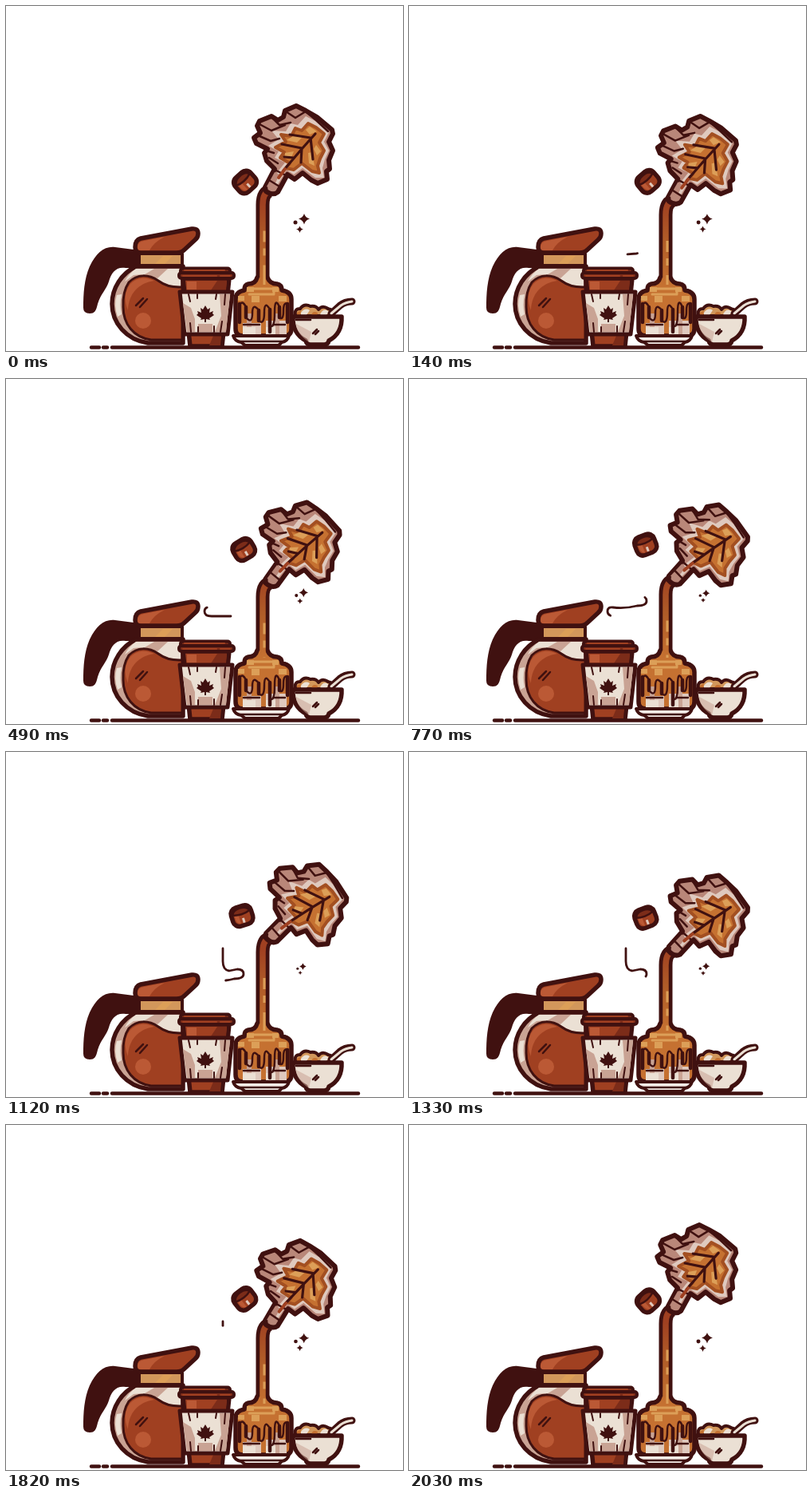
Animation of 498 by 432 pixels, one loop 2.1 s. Source, as an HTML page:

```html
<!DOCTYPE html>
<html lang="en">
<head>
<meta charset="utf-8">
<title>Maple syrup breakfast</title>
<style>
  html, body { margin: 0; width: 100%; height: 100%; overflow: hidden; background: #fff; }
  svg { display: block; width: 498px; height: 432px; }
  :root {
    --dark: #401110; --brown: #a04021; --rust: #bb5935; --deep: #7c2c19;
    --tan: #d2975b; --cream: #ebe0d4; --shade: #c9a394;
    --pink: #dfc9be; --mauve: #b98779; --amber: #c57131; --gold: #dc9f58; --syrup: #a34f21;
  }
  path, rect, circle { fill: none; stroke-linejoin: round; stroke-linecap: round; }
  .line { stroke: var(--dark); stroke-width: 5.5; }
  .mid { stroke: var(--dark); stroke-width: 4; }
  .thin { stroke: var(--dark); stroke-width: 2.5; }
  .pour { stroke-linecap: butt; }
  .dark { fill: var(--dark); }
  .brown { fill: var(--brown); }
  .rust { fill: var(--rust); }
  .deep { fill: var(--deep); }
  .tan { fill: var(--tan); }
  .cream { fill: var(--cream); }
  .shade { fill: var(--shade); }
  .pink { fill: var(--pink); }
  .mauve { fill: var(--mauve); }
  .amber { fill: var(--amber); }
  .gold { fill: var(--gold); }
</style>
</head>
<body>
<svg viewBox="0 0 498 432">
  <defs>
    <linearGradient id="flow" gradientUnits="userSpaceOnUse" x1="0" y1="235" x2="0" y2="350">
      <stop offset=".1" stop-color="#a04021"/>
      <stop offset=".5" stop-color="#b05c28"/>
      <stop offset="1" stop-color="#c57131"/>
    </linearGradient>
  </defs>
  <path class="line" style="stroke-width:4.5" d="M107 427.500H117M122 427.500H127M133 427.500H442"/>

  <!-- coffee pot -->
  <path class="dark" d="M97 378C97 360 98 342 105 326C113 309 124 300 137 302L168 306V328H150C138 326 132 334 129 345C126 355 119 360 115 373C113 382 111 385 105 385Q97 385 97 378Z"/>
  <path class="line shade" d="M163 326H222V422H178C151 418 133 397 133 373C133 353 145 335 163 326Z"/>
  <path class="cream" d="M163 329H219V351Q204 352 192 343T160 337L149 345Q154 335 163 329ZM139 362Q135 374 140 389L145 386Q142 374 145 361Z"/>
  <path class="shade" d="M186 329L174 336L190 341L203 329Z"/>
  <path class="mid brown" style="stroke-width:3" d="M154 346C165 335 179 336 191 344Q203 353 221 352V418H182C160 415 147 398 147 377Q146 358 154 346Z"/>
  <path class="rust" d="M156 348C165 339 176 339 186 344C166 347 154 360 153 381Q145 362 156 348Z"/>
  <circle class="rust" cx="172" cy="394" r="10"/>
  <path class="thin" d="M163 375L172 366M168 377L177 367"/>
  <path class="mid tan" d="M167 310H221V325H167Z"/>
  <path class="gold" d="M197 313L187 323H199L209 313Z"/>
  <path class="line brown" d="M162 302Q162 293 169 291L233 279Q241 278 241 285Q241 290 237 293L224 305Q220 309 214 309H169Q162 309 162 302Z"/>
  <path class="rust" d="M165 302Q165 295 173 294L199 289Q185 296 180 306H169Q165 306 165 302Z"/>

  <!-- takeaway cup -->
  <path class="line brown" d="M222 341H280L271 426H231Z"/>
  <path class="rust" d="M227 345H239V355H227Z"/>
  <path class="deep" d="M265 344H277L276 356H257ZM260 413H270L269 425H255Z"/>
  <rect class="mid deep" x="219" y="328.500" width="62" height="8" rx="3"/>
  <rect class="mid deep" x="217" y="334" width="69" height="7" rx="3"/>
  <path style="stroke:var(--brown);stroke-width:2" d="M224 331H274M222 338H264M269 338H281"/>
  <path class="line cream" style="stroke-width:5" d="M218 358H284L278 411H224Z"/>
  <path class="shade" d="M222 372L232 378L237 392V408H227ZM268 361H281L276 408H262L270 388ZM241 398H259V408H241Z"/>
  <path class="thin" style="stroke-width:2" d="M229 361L231 370M240 361V366M264 361L263 367M275 361L274 374M231 397L232 408M241 402V408M261 401V408M271 395L269 408"/>
  <path class="dark" transform="translate(250 385)" d="M0-10L3-5L6-7L5-1L10-3L9 0L11 2L5 6L6 8L1 7V11H-1V7L-6 8L-5 6L-11 2L-9 0L-10-3L-5-1L-6-7L-3-5Z"/>

  <!-- pouring syrup outline -->
  <path class="pour" stroke="var(--dark)" stroke-width="17"/>

  <!-- waffle stack -->
  <path class="line amber" d="M315 340Q313 348 304 348Q299 349 299 356Q288 358 288 367V404Q288 413 297 413H349Q358 413 358 404V367Q358 358 346 356Q346 349 340 348Q331 348 328 340"/>
  <path class="gold" d="M302 352H311V358H302ZM334 352H342V358H334ZM291 363H299V369H291ZM342 363H352V370H342ZM308 363H318V371H308Z"/>
  <path style="stroke:var(--gold);stroke-width:3" d="M309 354H336V361H305"/>
  <path class="pink" d="M297 397H320V411H297ZM326 394H352V411H326Z"/>
  <path class="shade" d="M302 385H308V411H302ZM338 385H343V411H338Z"/>
  <path class="cream" d="M297 402H313V411H297ZM326 402H338V411H326Z"/>
  <path class="mid" d="M293 373V396M301 377V390M317 381V394M331 380V408M343 377V390M353 373V396" style="stroke-width:4.5"/>
  <path class="thin" d="M293 374Q297 368 301 377M301 390Q309 399 309 385T317 381M317 394Q324 400 324 384T331 380M331 400Q337 405 337 384T343 377M343 390Q348 394 348 382T353 373M298 399H318M335 399H350"/>
  <path class="mid" style="fill:#f4ece7" d="M285 413H355Q353 420 346 421L342 425H300L295 421Q287 420 285 413Z"/>
  <path class="thin" d="M295 420H346"/>

  <path class="pour" stroke="url(#flow)" stroke-width="7.5"/>
  <path class="pour" stroke="var(--gold)" stroke-width="3" transform="translate(2)" stroke-dasharray="0 55 14 8 9 12 22"/>

  <!-- bowl -->
  <path class="mid tan" d="M363 388Q361 379 369 379Q374 372 382 376Q389 375 392 380Q397 374 404 379Q411 380 411 388Z"/>
  <path class="cream" d="M370 384Q375 377 381 381L377 387H370ZM394 386Q399 377 405 383L402 387H395Z"/>
  <path class="amber" d="M365 384L370 381L369 388H365ZM383 388Q384 381 391 384L390 388Z"/>
  <path class="line" style="stroke-width:9" d="M408 385L419 375Q425 370 434 370"/>
  <path d="M408 385L420 375Q426 371 434 370" stroke="var(--cream)" stroke-width="3"/>
  <path class="line cream" d="M360 389H421Q422 410 405 419Q404 424 399 424H382Q377 424 376 419Q359 410 360 389Z"/>
  <path class="shade" opacity=".55" d="M364 398L383 408L380 421Q364 410 364 398Z"/>
  <path class="thin" d="M364 393H382M385 410L390 405M388 411L392 407"/>

  <path id="steam" class="thin" style="stroke-width:2.8" pathLength="175" d="M272 311L285 310Q293 309 293 303T285 297H258Q249 297 249 291T256 286Q270 288 286 284Q298 284 298 278T290 272L280 274Q272 273 272 262V246"/>

  <g id="sparkles">
    <path class="dark" d="M374 260Q375.500 265 381 266.500Q375.500 268 374 273.500Q372.500 268 367 266.500Q372.500 265 374 260ZM368.500 275.500Q369.500 279 373 279.500Q369.500 280 368.500 284Q367.500 280 364 279.500Q367.500 279 368.500 275.500Z"/>
    <circle class="dark" cx="363" cy="271" r="2.500"/>
  </g>

  <g id="cap">
    <rect class="line brown" x="-13" y="-12" width="26" height="24" rx="8"/>
    <path class="rust" d="M-9-2H-4V9Q-10 8-9-2Z"/>
    <path class="pink" d="M-1 3H2V9H-1Z"/>
    <path class="thin deep" d="M-11-4Q-9-10 0-10T11-4Q6-2 0-2T-11-4Z"/>
  </g>

  <!-- maple bottle -->
  <g id="bottle">
    <path class="line mauve" style="stroke-width:6" d="M325 227L337 204L327 194L324 184L328 179L314 172L311 165L319 159L315 150L318 144L333 138L341 143L348 139L350 131L364 125L376 131L390 139L409 155L410 160L405 170L410 181L405 193L406 204L402 207L403 217L391 222L383 218L372 209L362 217L353 211L341 233Q335 238 326 232Z"/>
    <path class="pink" d="M342 206L350 196L337 190L342 182L329 175L342 167L333 156L351 157L357 147L366 149L376 138L388 144L405 158L399 170L405 181L400 192L397 203L399 215L388 215L372 203L361 211L352 205L340 225L334 221Z"/>
    <path class="mauve" d="M327 226L337 208L343 211L334 230Z"/>
    <path class="thin" d="M316 162L332 169L343 166M318 148L333 156L350 149M334 140L343 149L357 146M351 132L363 140L376 132M378 134L389 143L404 157M326 181L336 184M330 190L341 197M337 205L351 212M330 218L343 226"/>
    <path class="amber" stroke="var(--syrup)" stroke-width="4" d="M351 203L356 197L344 190L349 183L338 177L351 170L345 161L358 163L363 153L371 156L379 147L389 152L399 160L393 171L399 181L394 191L391 200L393 209L384 207L371 197L361 205Z"/>
    <path class="gold" d="M352 168L365 171L373 163L363 161ZM376 155L381 151L390 157L381 161ZM350 184L361 182L358 190L350 189ZM379 184L384 183L387 200L380 197ZM389 174L395 182L390 187L386 179Z"/>
    <path class="mid" style="stroke-width:3.200" d="M348 206L371 179L388 160M356 161L382 165L385 192M346 173L371 178L370 196M349 189L361 190"/>
    <path stroke="var(--brown)" stroke-width="4" d="M342 215L350 204"/>
  </g>
</svg>
<script>
  const LOOP = 2100, STEP = 70;
  const $ = id => document.getElementById(id);
  const pours = document.querySelectorAll('.pour');
  // [time, drop] of the bottle
  const drops = [[0, 0], [70, 3], [140, 12.5], [280, 20], [490, 24], [560, 24], [770, 21],
    [910, 11], [1015, 1], [1120, 1.5], [1190, 8], [1330, 18], [1540, 24], [1610, 24],
    [1820, 18], [2030, 0], [2100, 0]];

  function dropAt(t) {
    const i = drops.findIndex(([time]) => time > t);
    const [t0, a] = drops[i - 1], [t1, b] = drops[i];
    return a + (b - a) * (t - t0) / (t1 - t0);
  }

  function pose(t) {
    const swing = (1 - Math.cos(2 * Math.PI * t / LOOP)) / 2;
    const drop = dropAt(t);
    const set = (id, value) => $(id).setAttribute('transform', value);

    set('bottle', `translate(0 ${drop}) rotate(${17 * swing} 330 230)`);
    set('cap', `translate(${300 - 4 * swing} ${220.5 - 15.5 * swing}) rotate(${-42 + 25 * swing})`);
    set('sparkles', `translate(370 271.5) scale(${1 - 0.4 * swing}) translate(-370 -271.5)`);

    const d = `M332 ${231 + drop}Q322 ${233 + drop} 322 ${249 + drop}V349`;
    pours.forEach(p => p.setAttribute('d', d));

    const head = Math.min(175, Math.max(0, 0.183 * (t - 65)));
    const tail = Math.max(0, 0.1 * (t - 120));
    const steam = $('steam').style;
    steam.visibility = head > tail ? 'visible' : 'hidden';
    steam.strokeDasharray = `${Math.max(0, head - tail)} 400`;
    steam.strokeDashoffset = -tail;
  }

  // Each pose is held for one step.
  const start = performance.now();
  function tick() {
    const t = (performance.now() - start) % LOOP;
    pose(Math.floor(t / STEP) * STEP);
    requestAnimationFrame(tick);
  }
  tick();
</script>
</body>
</html>
```
